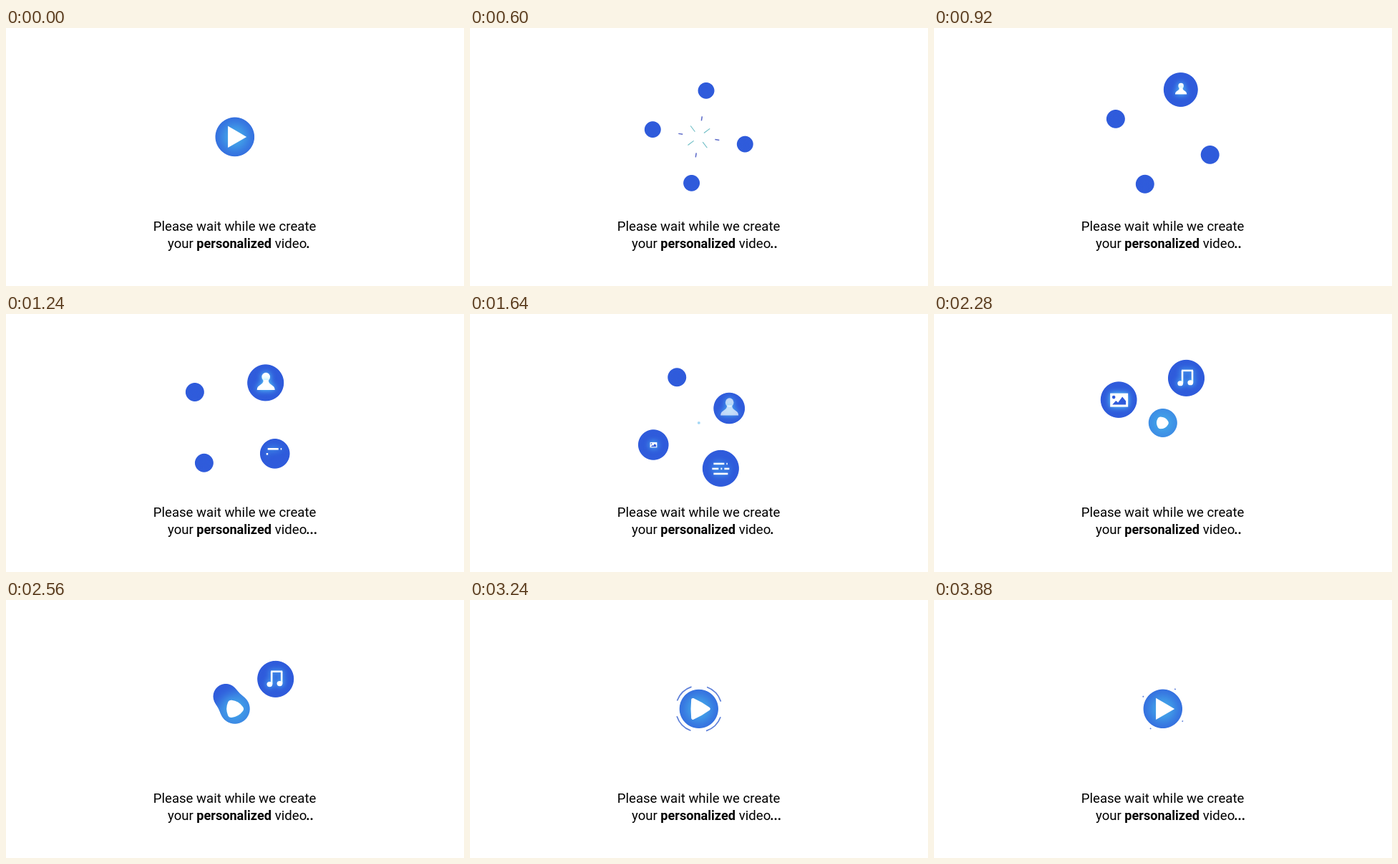
Write an HTML page with a canvas that moves like this. It is 640x360 px and loops after 3.92 s.

```html
<!DOCTYPE html>
<html lang="en">
<head>
<meta charset="utf-8">
<title>Please wait</title>
<style>
  html, body { margin: 0; width: 640px; height: 360px; overflow: hidden; background: #fff; }
  canvas { position: absolute; left: 0; top: 0; }
  #blobs { filter: url(#goo); }
  svg { position: absolute; width: 0; height: 0; }
</style>
</head>
<body>
<svg>
  <filter id="goo" x="0" y="0" width="100%" height="100%" color-interpolation-filters="sRGB">
    <feGaussianBlur stdDeviation="5.5"/>
    <feColorMatrix values="1 0 0 0 0  0 1 0 0 0  0 0 1 0 0  0 0 0 15 -7"/>
  </filter>
</svg>
<canvas id="blobs" width="640" height="360"></canvas>
<canvas id="details" width="640" height="360"></canvas>
<script>
const LOOP = 3920, CX = 319.8, CY = 151.9, ORBIT = 70.5, BLUE = '#2f5bdb';
const SHOOT = 413, GROW = 640, RETURN = 1415;
const goo = document.getElementById('blobs').getContext('2d');
const ctx = document.getElementById('details').getContext('2d');

const clamp = v => Math.min(1, Math.max(0, v));
const phase = (t, start, length) => clamp((t - start) / length);
const smooth = u => u * u * (3 - 2 * u);
const easeOut = (u, power) => 1 - (1 - u) ** power;
const rad = deg => deg * Math.PI / 180;

// Eased value between [time, value] pairs.
function keyed(t, keys) {
  const next = keys.findIndex(k => k[0] > t);
  if (next === 0) return keys[0][1];
  if (next < 0) return keys[keys.length - 1][1];
  const [t0, v0] = keys[next - 1], [t1, v1] = keys[next];
  return v0 + (v1 - v0) * smooth((t - t0) / (t1 - t0));
}

// Orbit rotation in degrees: slow start, then accelerating.
function rotation(t) {
  const s = Math.max(t, 200) / 1000, a = s - 0.6, b = s - 1.24, c = s - 2;
  return -81 + 44.53 * a + 20.36 * a * b - 3.55 * a * b * c;
}

const glow = goo.createRadialGradient(CX, CY, 0, CX, CY, 28.5);
glow.addColorStop(0, '#45b6ec');
glow.addColorStop(0.55, '#3f93e6');
glow.addColorStop(1, BLUE);

// The goo filter shrinks small circles, so they are drawn a little larger.
function blob(x, y, r) {
  if (r < 0.8) return;
  goo.fillStyle = glow;
  goo.beginPath();
  goo.arc(x, y, r + Math.min(5, 13 / r), 0, 7);
  goo.fill();
}

function line(x1, y1, x2, y2) {
  ctx.beginPath();
  ctx.moveTo(x1, y1);
  ctx.lineTo(x2, y2);
  ctx.stroke();
}

function disc(x, y, r, ry = r) {
  ctx.beginPath();
  ctx.ellipse(x, y, r, ry, 0, 0, 7);
  ctx.fill();
}

// Draws the segments one after another up to a share of their total length.
function trace(segments, p) {
  const length = s => Math.hypot(s[2] - s[0], s[3] - s[1]);
  let left = p * segments.reduce((sum, s) => sum + length(s), 0);
  for (const s of segments) {
    if (left <= 0) break;
    const u = Math.min(1, left / length(s));
    line(s[0], s[1], s[0] + (s[2] - s[0]) * u, s[1] + (s[3] - s[1]) * u);
    left -= length(s);
  }
}

const TEXT_ROWS = [
  [-10, -6.5, 5, -6.5], [8, -6.5, 9.5, -6.5],
  [-12, 0.5, -3, 0.5], [0, 0.5, 2, 0.5], [5, 0.5, 12, 0.5],
  [-10, 7.5, 10, 7.5]
];
const NOTE_STEMS = [[-6.5, -10.5, 9.5, -10.5], [8.5, -10.5, 8.5, 6], [-5.5, -10.5, -5.5, 7]];

const icons = [
  function person(p) {
    ctx.scale(p, p);
    disc(0.5, -8, 5.8, 6.2);
    ctx.beginPath();
    ctx.moveTo(-12, 10);
    ctx.bezierCurveTo(-12, 2, -3, 4, -3, -4);
    ctx.lineTo(4, -4);
    ctx.bezierCurveTo(4, 4, 13, 2, 13, 10);
    ctx.fill();
  },
  function text(p) {
    trace(TEXT_ROWS, p);
  },
  function picture(p) {
    ctx.scale(p, p);
    ctx.fillRect(-12, -9, 25, 19);
    ctx.shadowBlur = 0;
    ctx.fillStyle = BLUE;
    disc(-7, -3.5, 2.3);
    ctx.beginPath();
    [[-9, 7], [-4, 1.5], [-1, 4], [5, -4], [10, 2], [10, 7]].forEach(q => ctx.lineTo(...q));
    ctx.fill();
  },
  function notes(p) {
    trace(NOTE_STEMS, p);
    const head = phase(p, 0.7, 0.3);
    disc(-8.3, 7.3, 3.9 * head, 3.6 * head);
    disc(5.8, 6.3, 3.9 * head, 3.6 * head);
  }
];

function drawIcon(i, x, y, t) {
  const p = phase(t, GROW + 390 * i + 130, 230);
  const fade = 1 - phase(t, RETURN + 410 * i + 195, 95);
  if (p <= 0 || fade <= 0) return;
  ctx.save();
  ctx.translate(x, y);
  ctx.globalAlpha = fade;
  ctx.fillStyle = ctx.strokeStyle = '#fff';
  ctx.lineWidth = 2.6;
  ctx.shadowColor = '#5fdcff';
  ctx.shadowBlur = 9;
  icons[i](p);
  ctx.restore();
}

function drawBalls(t) {
  if (t < SHOOT) return;
  const out = easeOut(phase(t, SHOOT, 322), 3);
  for (let i = 0; i < 4; i++) {
    const back = phase(t, RETURN + 410 * i, 390);
    if (back >= 1) continue;
    const near = 1 - back * back;
    const d = ORBIT * out * near;
    const grow = smooth(phase(t, GROW + 390 * i, 360));
    const r = back > 0 ? 13 + 12.6 * near ** 0.85 : 13 * out ** 1.6 + 12.6 * grow;
    const angle = rad(rotation(t) + 90 * i);
    const x = CX + d * Math.cos(angle), y = CY + d * Math.sin(angle);
    blob(x, y, r);
    drawIcon(i, x, y, t);
  }
}

function drawBurst(t) {
  const u = phase(t, 420, 360);
  if (u <= 0 || u >= 1) return;
  const head = easeOut(u, 3);
  const ray = (deg, from, to) => {
    const c = Math.cos(rad(deg)), s = Math.sin(rad(deg));
    line(CX + from * c, CY + from * s, CX + to * c, CY + to * s);
  };
  for (let i = 0; i < 4; i++) {
    const deg = rotation(t) + 90 * i;
    ctx.strokeStyle = '#5a68c8';
    ctx.lineWidth = 1.5;
    ray(deg, 33 * easeOut(u, 1.7), 33 * head);
    ctx.strokeStyle = '#6bbcc4';
    ctx.lineWidth = 1.1;
    ray(deg + 44, 22 * u ** 1.29, 22 * head);
  }
}

const CORE = [[1600, 0], [1850, 19.5], [2210, 20], [2560, 21], [2680, 24], [2980, 24.5],
  [3120, 28.3], [3250, 27.2], [3880, 27.3]];
const TRI_SIZE = [[1960, 0], [2200, 0.25], [2560, 0.47], [3000, 0.6], [3240, 0.85], [3500, 1]];
const TRI_ROUND = [[1950, 0], [2000, 1], [2200, 4], [2560, 5], [3000, 4.5], [3240, 2.2], [3500, 0]];

// Triangle with rounded corners and sides that bulge with the rounding.
function drawTriangle(size, round) {
  if (size + round <= 0) return;
  const polar = (deg, r) => [CX - 1 + r * Math.cos(rad(deg)), CY + r * Math.sin(rad(deg))];
  const corner = 17.4 * size;
  ctx.fillStyle = ctx.strokeStyle = '#fff';
  ctx.beginPath();
  ctx.moveTo(...polar(0, corner));
  for (let deg = 60; deg < 360; deg += 120) {
    ctx.quadraticCurveTo(...polar(deg, corner / 2 + 0.6 * round), ...polar(deg + 60, corner));
  }
  ctx.closePath();
  ctx.fill();
  if (round > 0) {
    ctx.lineWidth = 2 * round;
    ctx.lineJoin = 'round';
    ctx.stroke();
  }
}

function drawCore(t) {
  if (t < 420) {
    const u = t / 420;
    const scale = Math.max(0, 1 - (2.7 * u ** 3 - 1.7 * u * u));
    blob(CX, CY, 27.4 * scale);
    drawTriangle(scale, 0);
  } else if (t > 1600) {
    blob(CX, CY, keyed(t, CORE));
    drawTriangle(keyed(t, TRI_SIZE), keyed(t, TRI_ROUND));
  }
}

function drawArcs(t) {
  if (t < 3040) return;
  const span = keyed(t, [[3040, 0], [3240, 51], [3900, 3]]);
  const middle = keyed(t, [[3040, -28], [3240, -44], [3900, -58]]);
  ctx.strokeStyle = '#5d7fd8';
  ctx.lineWidth = 1.7;
  for (let i = 0; i < 4; i++) {
    const a = middle + 90 * i;
    ctx.beginPath();
    ctx.arc(CX, CY, 32.4, rad(a - span / 2), rad(a + span / 2));
    ctx.stroke();
  }
}

function drawCaption(t) {
  const regular = '18.6px Roboto, sans-serif', bold = 'bold 18.1px Roboto, sans-serif';
  const write = (words, x, y, font) => {
    ctx.font = font;
    ctx.fillText(words, x, y);
  };
  const dots = t >= 2700 ? 3 : Math.floor(t / 540) % 3 + 1;
  ctx.fillStyle = '#000';
  write('Please wait while we create', 205.8, 283, regular);
  write('your', 226, 306.5, regular);
  write('personalized', 266.3, 306.5, bold);
  write('video', 375.8, 306.5, regular);
  write('.'.repeat(dots), 419.3, 306.5, bold);
}

function render(t) {
  goo.clearRect(0, 0, 640, 360);
  ctx.clearRect(0, 0, 640, 360);
  drawBalls(t);
  drawBurst(t);
  drawCore(t);
  drawArcs(t);
  drawCaption(t);
}

let start;
function tick(now) {
  start ??= now;
  render(Math.max(0, now - start) % LOOP);
  requestAnimationFrame(tick);
}
render(0);
requestAnimationFrame(tick);
</script>
</body>
</html>
```
